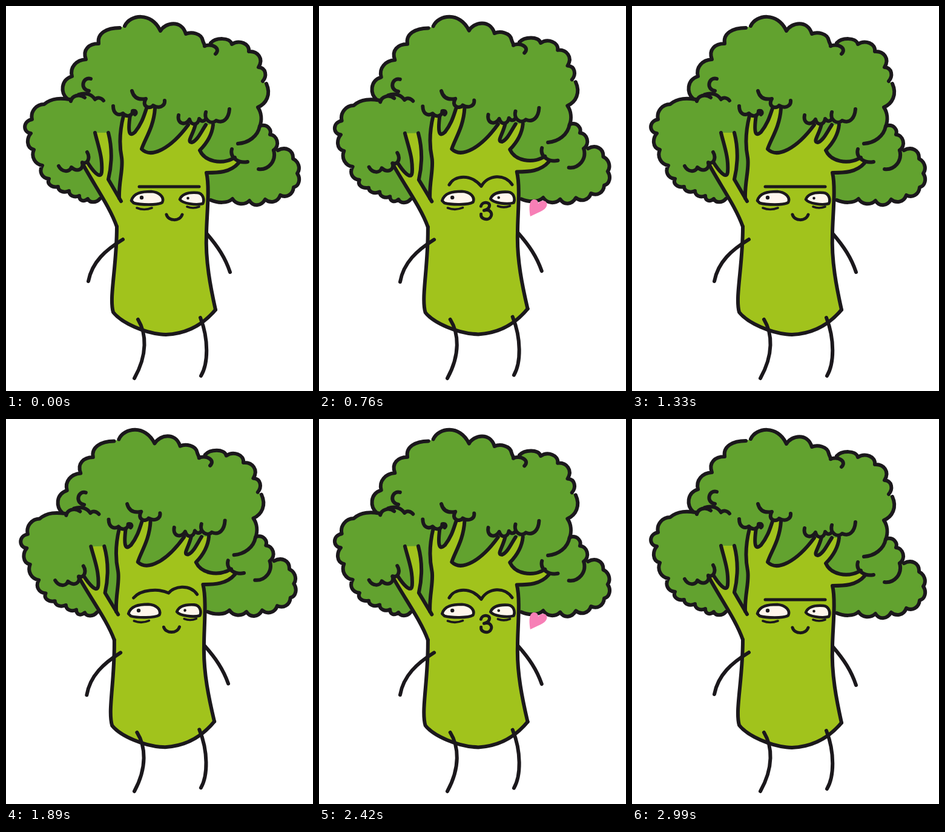
Write an HTML page that moves like this. It is 507 px wide and 635 px high and loops after 3320 ms.

```html
<!DOCTYPE html>
<html lang="en">
<head>
<meta charset="utf-8">
<title>Broccoli</title>
<style>
html, body { margin: 0; width: 100%; height: 100%; overflow: hidden; background: #fff; }
svg { display: block; width: 100vw; height: 100vh; }
.line { fill: none; stroke: #1b181c; stroke-width: 6; stroke-linecap: round; stroke-linejoin: round; }
.thin { stroke-width: 3.6; }
.face { stroke-width: 5; }
.eye { fill: #fff6ec; stroke-width: 4.6; }
</style>
</head>
<body>
<svg viewBox="0 0 507 635">
  <g id="body"></g>
  <path id="heart" fill="#f77fb6" d="M349 347 C347 335 346 320 355 319 C360 319 362 322 362 326 C367 318 379 321 376 330 C373 338 360 341 349 347 Z"/>
</svg>
<script>
const body = document.getElementById('body');
const heart = document.getElementById('heart');

function add(tag, attrs, parent = body) {
  const el = document.createElementNS('http://www.w3.org/2000/svg', tag);
  for (const key in attrs) el.setAttribute(key, attrs[key]);
  parent.appendChild(el);
  return el;
}
const line = (d, extra = '', parent = body) => add('path', { d, class: 'line ' + extra }, parent);

// Fills the joined outline, then inks each stroke separately so the gaps stay open.
function shape(strokes, color) {
  add('path', { d: 'M' + strokes.join(' L') + ' Z', fill: color });
  return strokes.map(s => 'M' + s);
}

const crown = shape([
  '101 153 C90 143 90 122 109 116 C105 101 116 89 132 88 C126 72 137 62 153 62 C150 45 166 36 188 36',
  '196 33 C205 14 240 9 255 41 C263 27 290 22 297 46 C306 42 323 45 325 57 C326 61 328 63 328 66',
  '338 61 C346 52 370 51 373 63 C385 55 403 62 401 75 C416 74 426 87 417 101 C430 102 431 116 424 124',
  '430 128 C438 146 430 161 416 167 C422 176 423 188 419 199',
  '421 197 C433 195 439 205 436 212 C448 213 453 230 442 238',
  '449 238 C462 231 475 238 474 252 C483 256 487 268 481 276 C487 285 484 297 475 299 C474 311 463 317 453 312 C449 324 436 326 428 319 C421 331 408 331 402 321 C394 329 380 328 374 318 C366 326 349 325 338 320',
  '155 318 C149 325 138 325 135 318 C128 324 121 321 121 313 C112 317 104 312 104 305 C95 309 86 305 86 298 C75 300 67 293 71 285 C59 284 54 273 60 263 C48 261 41 249 46 237 C33 234 34 218 41 210 C28 209 27 190 43 187 C40 174 50 162 63 162 C76 151 92 152 105 154'
], '#62a22f');

const trunk = shape([
  '183 364 C172 332 146 296 126 259',
  '134 257 C142 270 156 288 158 274 C160 250 152 230 147 209',
  '169 209 C177 240 174 265 169 286 L190 322',
  '187 317 C186 290 194 268 191 250 C187 230 188 205 194 181',
  '205 180 C200 215 206 214 213 208 C225 193 228 180 232 169',
  '246 169 C244 200 229 220 224 236 C240 252 272 235 301 196',
  '313 195 C308 215 298 224 307 225 C316 222 322 208 330 196',
  '342 196 C340 215 330 228 320 238 C328 256 355 263 378 250',
  '384 259 C370 275 350 275 331 275 C337 300 331 350 331 376 C329 420 338 465 346 501',
  '346 501 C320 532 290 541 264 542 C230 541 190 522 177 505 C170 480 183 430 183 364'
], '#a1c31c');

const curls = [
  'M140 120 C127 116 121 137 137 140',
  'M107 157 C109 148 121 144 130 151 M120 146 C132 142 142 146 147 154 C151 150 157 151 161 156',
  'M328 66 C338 61 356 69 346 79',
  'M419 198 C416 215 400 226 383 227',
  'M442 238 C447 256 433 271 417 269',
  'M177 165 C177 177 185 182 193 177 C199 184 209 182 209 173 C215 172 216 176 213 179',
  'M208 140 C211 152 220 155 231 153 C223 166 238 171 243 164 C253 170 263 165 262 156',
  'M285 180 C282 195 297 198 303 187 C306 198 317 197 319 186 C323 192 328 190 330 186',
  'M330 175 C326 189 340 196 347 189 C360 195 368 184 369 170',
  'M87 264 C92 274 105 275 108 266 C118 275 129 269 126 258 C136 262 139 249 134 241',
  'M373 236 C369 250 384 260 399 257'
];
const limbs = [
  'M193 385 C165 402 142 422 136 454',
  'M332 376 C350 397 362 415 370 439',
  'M218 517 C232 540 234 575 212 614',
  'M321 514 C335 550 334 590 322 610'
];
[...crown, ...trunk, ...curls, ...limbs].forEach(d => line(d));

line('M207 321 C211 308 224 306 240 306 C254 307 262 316 258 324 C250 329 222 328 211 325 Z', 'eye');
line('M287 319 C291 309 303 307 316 308 C326 309 328 320 325 326 C314 329 292 326 287 319 Z', 'eye');
add('circle', { cx: 224, cy: 316, r: 3.2, fill: '#1b181c' });
add('circle', { cx: 300.5, cy: 317, r: 2.3, fill: '#1b181c' });
line('M216 333 Q228 338 241 333 M299 331 Q309 335 319 331', 'thin');

const smile = 'M265 344 C268 355 287 356 291 344';
const poses = {
  calm: { lean: 0, brow: 'M220 298 L319 298', mouth: smile },
  lift: { lean: 0.95, brow: 'M216 295 C228 281 258 280 274 288 C282 277 309 273 321 291', mouth: smile },
  grin: {
    lean: 0,
    brow: 'M214 289 C226 260 262 257 276 279 C285 256 319 255 322 289',
    mouth: 'M265 342 C270 339 281 337 290 338 C294 345 285 353 276 352 C270 351 266 347 265 342 Z',
    teeth: 'M274 342 L274 347 M283 340 L284 346'
  },
  kiss: {
    lean: 0.72, heart: true,
    brow: 'M219 295 C228 279 255 277 272 298 C283 279 311 277 323 296',
    mouth: 'M271 331 C273 322 287 324 285 331 C284 335 280 337 276 338 C287 335 291 344 286 350 C281 355 270 352 271 344'
  }
};

for (const pose of Object.values(poses)) {
  pose.group = add('g', {});
  line(pose.brow, 'face', pose.group);
  const mouth = line(pose.mouth, 'face', pose.group);
  if (pose.teeth) {
    mouth.style.fill = '#fff6ec';
    line(pose.teeth, 'thin', pose.group).style.strokeWidth = 1.5;
  }
}

// Start time (ms) and pose of each hold.
const period = 1660;
const timeline = [
  [0, 'calm'], [230, 'lift'], [360, 'grin'], [560, 'kiss'], [630, 'grin'],
  [760, 'kiss'], [960, 'grin'], [1130, 'kiss'], [1200, 'grin'], [1330, 'calm']
];

function render(time) {
  const t = time % period;
  const name = timeline.filter(([start]) => start <= t).pop()[1];
  const pose = poses[name];
  body.setAttribute('transform', `rotate(${-pose.lean} 215 615)`);
  for (const key in poses) poses[key].group.style.display = key === name ? '' : 'none';
  heart.style.display = pose.heart ? '' : 'none';
}

const begin = performance.now();
function tick() {
  render(performance.now() - begin);
  requestAnimationFrame(tick);
}
render(0);
requestAnimationFrame(tick);
</script>
</body>
</html>
```
